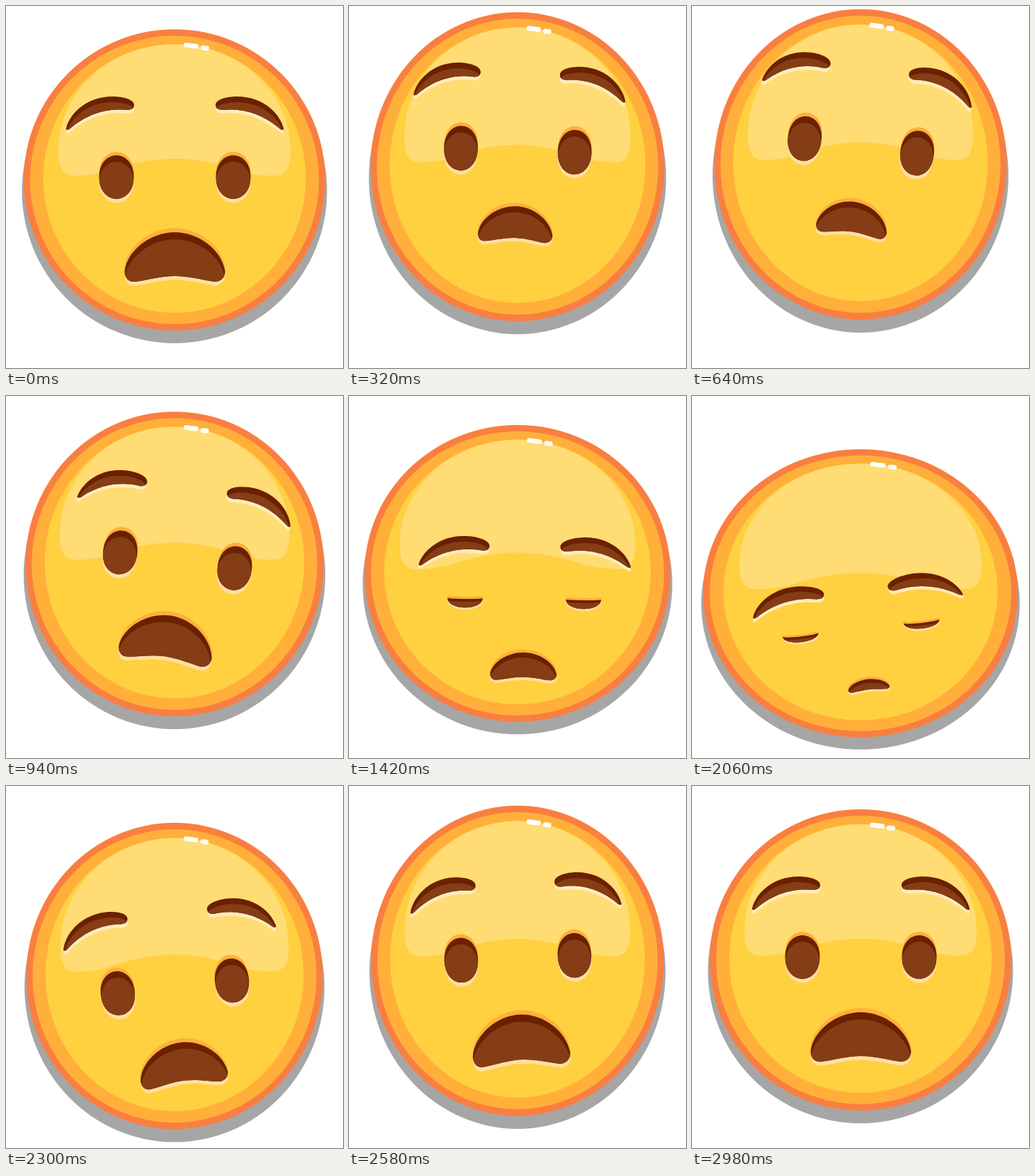
Write an HTML page with a canvas that moves like this. It is 476x512 px and loops after 3 s.

```html
<!DOCTYPE html>
<html lang="en">
<head>
<meta charset="utf-8">
<title>Worried face</title>
<style>
html, body { margin: 0; width: 476px; height: 512px; overflow: hidden; background: #fff; }
canvas { display: block; }
</style>
</head>
<body>
<canvas id="stage" width="476" height="512"></canvas>
<script>
const ctx = document.getElementById('stage').getContext('2d');
const LOOP = 3000, R = 213;
const DARK = '#6b2000', LIGHT = '#843d14', ORANGE = '#ffb03a', CREAM = '#ffdfa2';

function ease(t, from, to) {
  const u = Math.min(1, Math.max(0, (t - from) / (to - from)));
  return u * u * (3 - 2 * u);
}

// Goes 0 to 1 between a and b, and back to 0 between c and d.
const pulse = (t, a, b, c, d) => ease(t, a, b) - ease(t, c, d);

// The whole pose follows from a few overlapping moods.
function poseAt(t) {
  const hop = pulse(t, 0, 460, 520, 1220);
  const lift = pulse(t, 0, 460, 520, 1100);
  const sink = pulse(t, 1250, 1950, 2100, 2640);
  const squash = pulse(t, 1180, 1840, 2000, 2420);
  const spring = pulse(t, 2000, 2420, 2480, 3000);
  const sag = pulse(t, 800, 1740, 2060, 2460);
  const droop = pulse(t, 1060, 1720, 2040, 2300);
  const blink = pulse(t, 1180, 1460, 2060, 2260);
  const pout = pulse(t, 1060, 1720, 2040, 2400) + lift / 2;
  return {
    y: 246 - 24 * hop + 33 * sink,
    stretch: (7 * hop - 10.3 * squash + 7 * spring) / R,
    faceX: .5 + 9 * pulse(t, 600, 1380, 1440, 1860),
    faceY: -4 - 24 * lift + 55 * sag,
    tilt: 8 * pulse(t, 100, 800, 860, 1550) - 7 * pulse(t, 1400, 1960, 2150, 2850),
    open: 1 - blink,
    lidTop: 41 - 45 * blink,
    lidLow: 41 - 21 * blink - 5 * droop,
    browX: 105.5 - 12.5 * droop,
    browY: -85 - 5 * lift + 42 * droop,
    browTilt: 7 * droop,
    mouthY: 113 - 28 * pout,
    mouthW: 1 - .61 * pout,
    mouthH: 1 - .76 * pout
  };
}

const shine = new Path2D(`M-164-42A164 150 0 0 1 164-42C164-14 156-6 140-6C125-6 110-8 95-12
  C70-20 40-30 0-30C-40-30-70-20-95-12C-110-8-125-6-140-6C-156-6-164-14-164-42Z`);
const brow = new Path2D(`M-48 16C-44-2-22-29 18-29C32-29 48-25 48-17C48-12 44-10 38-10
  C20-12-12-10-42 16C-45 19-49 19-48 16Z`);
const mouth = new Path2D(`M-71 20C-67-10-34-35 0-35C34-35 66-10 71 20C71 30 64 35 56 35
  C41 33 21 27 0 27C-21 27-39 33-56 35C-65 36-71 30-71 20Z`);

function group(x, y, degrees, draw) {
  ctx.save();
  ctx.translate(x, y);
  ctx.rotate(degrees * Math.PI / 180);
  draw();
  ctx.restore();
}

function ellipse(y, rx, ry, color) {
  ctx.fillStyle = color;
  ctx.beginPath();
  ctx.ellipse(0, y, rx, ry, 0, 0, 2 * Math.PI);
  ctx.fill();
}

function glint(x, y, w) {
  group(x, y, 7, () => {
    ctx.fillStyle = '#fff';
    ctx.beginPath();
    ctx.roundRect(-w / 2, -3.3, w, 6.6, 3);
    ctx.fill();
  });
}

// A dark cut-out with a lit inside, an orange rim above and a pale rim below.
function hollow(path, { above = 0, below, inset, w = 1, h = 1, rim = CREAM }) {
  const layer = (color, dy) => {
    ctx.save();
    ctx.translate(0, dy);
    ctx.scale(w, h);
    ctx.fillStyle = color;
    ctx.fill(path);
    ctx.restore();
  };
  if (above) layer(ORANGE, -above);
  layer(rim, below);
  layer(DARK, 0);
  ctx.save();
  ctx.scale(w, h);
  ctx.clip(path);
  ctx.scale(1 / w, 1 / h);
  layer(LIGHT, inset);
  ctx.restore();
}

function drawBody() {
  ellipse(15.5, 215.5, 215.5, 'rgba(0,0,0,.35)');
  ellipse(0, R, R, '#f97f40');
  ellipse(0, 204, 204, '#ffaf3a');
  ellipse(-2, 185.5, 190, '#ffd040');
  ctx.fillStyle = '#ffdc74';
  ctx.fill(shine);
  glint(23.5, -190, 21);
  glint(43, -186.5, 12);
}

function drawFace(p) {
  const eye = new Path2D(`M-24.5 0C-24.5 ${-p.lidTop} 24.5 ${-p.lidTop} 24.5 0
    C24.5 ${p.lidLow} -24.5 ${p.lidLow} -24.5 0Z`);
  for (const side of [-1, 1]) {
    group(side * 82.5, 0, 0, () =>
      hollow(eye, { above: 3 + 2 * p.open, below: 3 + 2.5 * p.open, inset: 3.5 + 5.5 * p.open }));
    group(side * p.browX, p.browY, -side * p.browTilt, () => {
      ctx.scale(-side, 1);
      hollow(brow, { below: 5, inset: 8, rim: '#ffecbc' });
    });
  }
  group(0, p.mouthY, 0, () => hollow(mouth, {
    w: p.mouthW, h: p.mouthH,
    above: 2.5 + 3.5 * p.mouthH, below: 3 + 2.5 * p.mouthH, inset: 4 + 6 * p.mouthH
  }));
}

function draw(t) {
  const p = poseAt(t);
  ctx.clearRect(0, 0, 476, 512);
  group(238, p.y, 0, () => {
    ctx.scale(1 - p.stretch, 1 + p.stretch);
    drawBody();
    group(p.faceX, p.faceY, p.tilt, () => drawFace(p));
  });
}

const start = performance.now();
function tick() {
  draw((performance.now() - start) % LOOP);
  requestAnimationFrame(tick);
}
tick();
</script>
</body>
</html>
```
